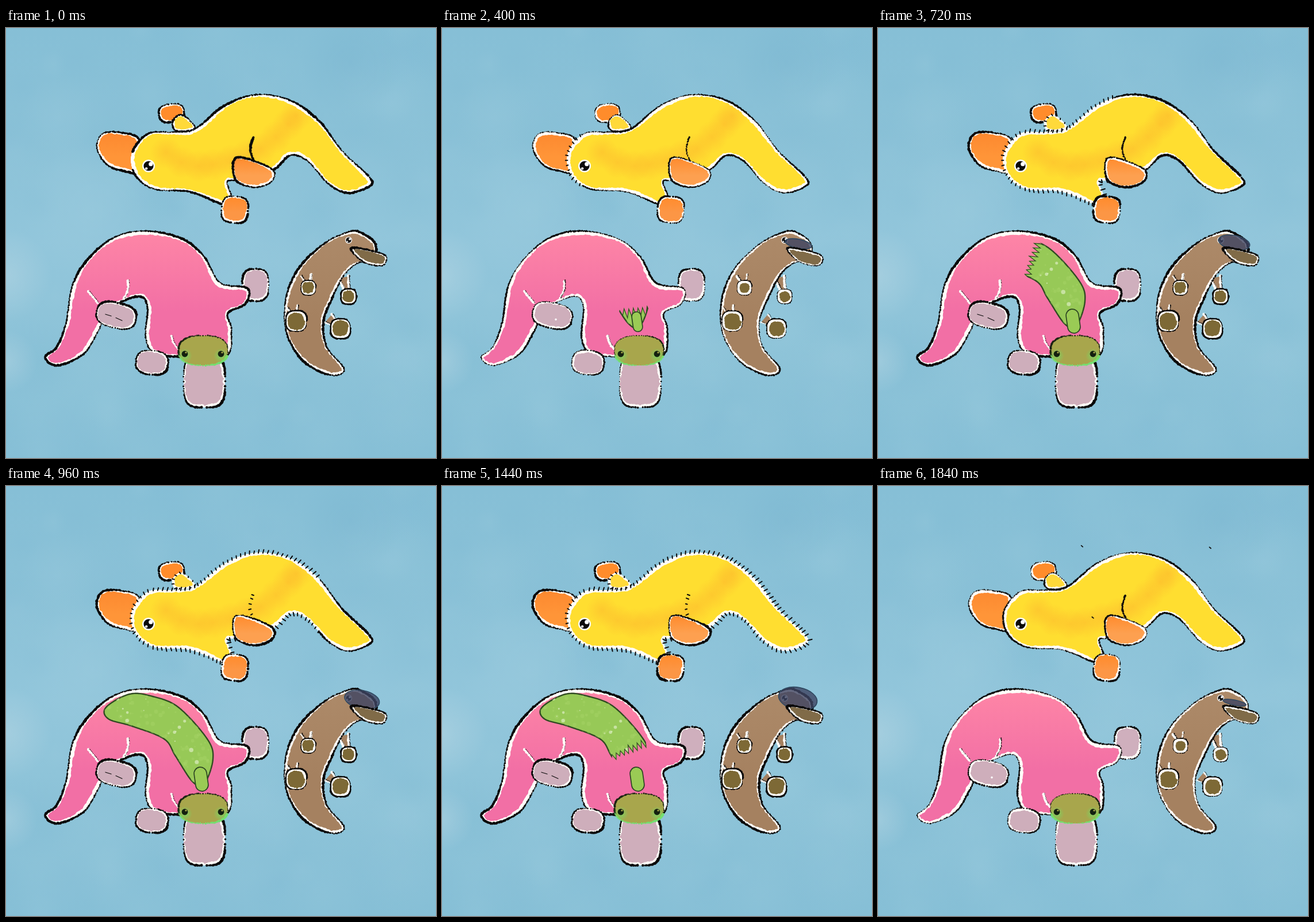
Recreate the animation shown at these times as an HTML page with a canvas. Size 748 by 748 pixels, loop 1.92 s.

```html
<!DOCTYPE html>
<html lang="en">
<head>
<meta charset="utf-8">
<title>Three platypuses</title>
<style>
html, body { margin: 0; width: 100%; height: 100%; overflow: hidden; background: #8cc2d8; }
canvas { display: block; }
</style>
</head>
<body>
<canvas id="stage" width="748" height="748"></canvas>
<script>
const SIZE = 748, STEP = 80, STEPS = 24;
const BLACK = '#0b0a0a', WHITE = '#fffdf8';
const ctx = document.getElementById('stage').getContext('2d');
let seed = 1, penWidth = 2;
const rnd = () => (seed = seed * 16807 % 2147483647) / 2147483647;
const clamp = v => Math.max(0, Math.min(1, v));

// Catmull-Rom curve through "x,y x,y ...", sampled about every 2 px
function curve(text, closed = true) {
  const keys = text.split(' ').map(p => p.split(',').map(Number));
  const n = keys.length, pts = [];
  const at = i => closed ? keys[(i + n) % n] : keys[Math.max(0, Math.min(n - 1, i))];
  for (let i = 0; i < (closed ? n : n - 1); i++) {
    const [a, b, c, d] = [at(i - 1), at(i), at(i + 1), at(i + 2)];
    const m = Math.max(1, Math.round(Math.hypot(c[0] - b[0], c[1] - b[1]) / 2));
    for (let j = 0; j < m; j++) {
      const t = j / m;
      pts.push([0, 1].map(e => b[e] + t * (c[e] - a[e] + t * (2 * a[e] - 5 * b[e] + 4 * c[e] - d[e]
        + t * (3 * b[e] - a[e] - 3 * c[e] + d[e]))) / 2));
    }
  }
  return pts;
}

// Superellipse: rounder for small power, boxier for large
function blob(x, y, rx, ry, turn = 0, power = 2.7) {
  const n = Math.round(1.5 * (rx + ry));
  const bend = v => Math.sign(v) * Math.abs(v) ** (2 / power);
  return Array.from({ length: n }, (_, i) => {
    const a = i / n * 2 * Math.PI;
    const u = rx * bend(Math.cos(a)), v = ry * bend(Math.sin(a));
    return [x + u * Math.cos(turn) - v * Math.sin(turn), y + u * Math.sin(turn) + v * Math.cos(turn)];
  });
}

function shape(pts, top, bottom = top) {
  const path = new Path2D();
  pts.forEach(([x, y]) => path.lineTo(x, y));
  path.closePath();
  const ys = pts.map(p => p[1]);
  const fill = ctx.createLinearGradient(0, Math.min(...ys), 0, Math.max(...ys));
  fill.addColorStop(0, top);
  fill.addColorStop(.6, bottom);
  return { pts, path, fill };
}

const yellow = {
  body: shape(curve('247,184 219,218 225,256 258,280 320,285 374,306 398,312 392,290 385,267 404,264 463,248 494,222 524,231 560,270 595,287 634,274 630,257 585,214 545,162 495,126 435,116 380,135 328,176 290,181'), '#ffde30'),
  bill: shape(curve('232,195 200,182 168,184 158,209 176,238 206,249 230,248'), '#fc882f', '#ff9538'),
  backFoot: shape(blob(288, 148, 22, 16, -.1), '#ff8c2b'),
  backLeg: shape(curve('290,162 306,151 329,174 296,179'), '#ffd93a'),
  fin: shape(curve('396,231 415,226 463,246 462,267 432,277 400,265'), '#ff8a2b', '#fda050'),
  foot: shape(blob(398, 316, 23, 23, .1, 3.2), '#ff8a2a', '#fc9645'),
  crease: curve('430,190 425,212 431,231', false),
  patches: curve('505,152 440,212 330,240 262,205', false)
};

const pink = {
  body: shape(curve('68,573 90,587 135,567 160,528 180,490 228,467 246,484 243,540 262,567 320,572 384,570 392,525 386,496 416,480 420,453 372,443 345,398 305,366 240,353 185,366 140,405 115,450 104,515 88,555'), '#fe86a6', '#f26fa5'),
  feet: [blob(192, 500, 35, 22, .22), blob(254, 582, 28, 21, .1)].map(p => shape(p, '#ceaebb')),
  hand: shape(blob(434, 447, 23, 28, 0, 3), '#cfafbd'),
  bill: shape(blob(345, 615, 36, 45, 0, 3.6), '#cfaebb'),
  head: shape(blob(343, 561, 43, 26, 0, 2.5), '#a8a64c'),
  creases: ['143,458 160,479', '212,440 212,456 204,472', '288,536 292,549 300,559'].map(t => curve(t, false))
};

const brown = {
  body: shape(curve('598,354 555,374 510,417 487,470 488,530 518,580 565,604 588,593 558,555 552,512 565,475 588,430 612,409 640,402 642,375 620,357'), '#ad8a69', '#a58160'),
  bill: shape(curve('600,384 625,385 660,396 655,413 622,407'), '#806b48'),
  outer: [foot(596, 467, 12, 587, 434), foot(582, 523, 16, 561, 505)],
  inner: [foot(526, 452, 12, 522, 430), foot(505, 510, 17, 498, 485)]
};

const pickle = shape(curve('174,385 215,362 255,366 300,385 350,440 360,475 345,518 325,515 295,470 275,440 220,418 178,405'), '#97c957');
const spine = curve('335,505 325,455 290,410 230,388 172,385', false);

// Round foot on a short leg that widens towards the joint
function foot(x, y, r, jx, jy) {
  const d = Math.hypot(x - jx, y - jy);
  const nx = (y - jy) / d, ny = (jx - x) / d;
  const sides = [-1, 1].map(k => curve(
    `${jx + k * 9 * nx},${jy + k * 9 * ny} ${(x + jx) / 2 + k * 5 * nx},${(y + jy) / 2 + k * 5 * ny} ${x + k * 4 * nx},${y + k * 4 * ny}`, false));
  return { sides, leg: shape([...sides[0], ...sides[1].reverse()], '#a58160'), pad: shape(blob(x, y, r, r), '#7d6936') };
}

function dot(x, y, r, color) {
  ctx.fillStyle = color;
  ctx.beginPath();
  ctx.arc(x, y, r, 0, 7);
  ctx.fill();
}

function wash(x, y, r, color) {
  const g = ctx.createRadialGradient(x, y, 0, x, y, r);
  g.addColorStop(0, color);
  g.addColorStop(1, color.slice(0, 7) + '00');
  dot(x, y, r, g);
}

// Dry ink line: dots of uneven size
function ink(pts, color = BLACK, w = penWidth, keep = () => true) {
  const phase = rnd() * 6;
  pts.forEach((p, i) => {
    const r = w * (.62 + .25 * Math.sin(i * .07 + phase) + .4 * rnd());
    if (keep(p)) dot(p[0] + rnd() - .5, p[1] + rnd() - .5, r, color);
  });
}

// Fill with a white rim along the inside of the edge
function paint(s, rim, detail = () => {}) {
  ctx.save();
  ctx.clip(s.path);
  ctx.fillStyle = s.fill;
  ctx.fill(s.path);
  detail();
  ink(s.pts, WHITE, rim);
  ctx.restore();
}

function draw(s, rim = 4.5) {
  paint(s, rim);
  ink(s.pts);
}

function crease(pts) {
  ink(pts, WHITE, 2.2);
  ink(pts.map(([x, y]) => [x + 2, y - 1]), BLACK, .9);
}

function stroke(x, y, dx, dy, w) {
  ctx.strokeStyle = BLACK;
  ctx.lineWidth = w;
  ctx.lineCap = 'round';
  ctx.beginPath();
  ctx.moveTo(x, y);
  ctx.lineTo(x + dx, y + dy);
  ctx.stroke();
}

// Shared growth of fur and pickle, from the head backwards
const growth = s => clamp((s - 3) / 8) ** 1.9;

// The outline turns to hairs, which later lift off and blow away
function furry(pts, s, length = 5) {
  const front = 220 + 325 * growth(s) + 35 * Math.max(0, s - 15);
  const lift = Math.max(0, s - 18);
  const ox = 4 * lift, oy = -2 * lift ** 2.2;
  const thin = s < 22 ? 1 : s < 23 ? 5 : 32;
  ink(pts, BLACK, penWidth, ([x]) => s >= 22 || x > front);
  for (let i = 0; i < pts.length - 1; i += 4) {
    const [x, y] = pts[i], [nx, ny] = pts[i + 1];
    if (s < 4 || x > front || (i / 4 + 5) % thin) continue;
    const d = Math.hypot(nx - x, ny - y) || 1;
    const ux = (y - ny) / d, uy = (nx - x) / d;
    const len = length * (.8 + .4 * rnd());
    if (lift) stroke(x + ox, y + oy, 2.6, 2.2, 1.7);
    else stroke(x - ux, y - uy, ux * len + 1.5, uy * len, 2);
  }
}

function eye(x, y, r) {
  dot(x, y, r, '#fff');
  dot(x, y, r * .78, BLACK);
  dot(x + r * .35, y - r * .3, r * .33, '#fff');
  dot(x - r * .35, y + r * .4, r * .2, '#fff');
}

function drawYellow(s) {
  draw(yellow.backFoot, 3.6);
  paint(yellow.backLeg, 3.6);
  furry(yellow.backLeg.pts, s, 2.5);
  draw(yellow.bill, 5);
  paint(yellow.body, 5.6, () => yellow.patches.forEach(([x, y], i) => {
    if (i % 14 === 0) wash(x, y, 28, '#fcb42c80');
  }));
  furry(yellow.body.pts, s);
  furry(yellow.crease, s);
  draw(yellow.foot, 4);
  draw(yellow.fin, 4);
  eye(248, 240, 11);
}

// Everything on one side of a jagged line across the spine
function jaggedCut(p, growing) {
  const i = Math.min(spine.length - 3, Math.round(p * (spine.length - 1)));
  const [cx, cy] = spine[i], [nx, ny] = spine[i + 2];
  const turn = Math.atan2(ny - cy, nx - cx);
  const edge = [];
  for (let b = -60, k = 0; b <= 60; b += 4, k++)
    edge.push([(k % 2 ? 1 : -1) * (3 + 6 * rnd()), b]);
  const far = growing ? -400 : 400;
  const region = new Path2D(), jag = new Path2D();
  const place = (path, [a, b]) => path.lineTo(
    cx + a * Math.cos(turn) - b * Math.sin(turn), cy + a * Math.sin(turn) + b * Math.cos(turn));
  edge.forEach(q => place(jag, q));
  [[far, -400], [0, -400], ...edge, [0, 400], [far, 400]].forEach(q => place(region, q));
  return { region, jag };
}

function drawPickle(s) {
  const growing = s < 13;
  const p = growing ? growth(s) : clamp((s - 15) / 8) ** 1.7;
  if (p === (growing ? 0 : 1)) return;
  const cut = p > 0 && p < 1 && jaggedCut(p, growing);
  ctx.save();
  if (cut) ctx.clip(cut.region);
  ctx.fillStyle = pickle.fill;
  ctx.fill(pickle.path);
  ctx.strokeStyle = '#304b22';
  ctx.lineWidth = 2.4;
  ctx.stroke(pickle.path);
  ctx.clip(pickle.path);
  seed = 99;
  for (let k = 0; k < 260; k++)
    dot(170 + rnd() * 190, 360 + rnd() * 160, .8 + rnd() * 3, k % 7 ? '#a9d46c60' : '#d8ecbac0');
  if (cut) ctx.stroke(cut.jag);
  ctx.restore();
}

function drawStem(s) {
  const grow = clamp((s - 1) / 6), left = clamp((23 - s) / 4);
  if (!grow || !left) return;
  const rx = (2.5 + 8.5 * grow) * Math.sqrt(left), ry = (10 + 11 * grow) * left;
  ctx.save();
  ctx.translate(339.5, 513 - 3 * grow - 52 * (1 - left));
  ctx.rotate(-.14);
  ctx.beginPath();
  ctx.roundRect(-rx, -ry, 2 * rx, 2 * ry, rx);
  ctx.fillStyle = '#9acb55';
  ctx.fill();
  ctx.lineWidth = 1.7;
  ctx.strokeStyle = '#2c4522';
  ctx.stroke();
  ctx.restore();
}

function drawPink(s) {
  draw(pink.hand);
  draw(pink.body, 6);
  pink.creases.forEach(crease);
  pink.feet.forEach(f => draw(f, 4));
  const pose = s % 3;
  if (pose === 0) stroke(173, 498, 10, 3, 1.3);
  if (pose < 2) stroke(191, 504, 11, 5, 1.2);
  else dot(198, 507, 1.8, '#fff');
  drawPickle(s);
  drawStem(s);
  seed = 500 + pose;
  draw(pink.bill, 5);
  ctx.fillStyle = pink.head.fill;
  ctx.fill(pink.head.path);
  ink(pink.head.pts, '#1c2413', penWidth * .8, p => p[1] < 570);
  ink(pink.head.pts, '#74df70', 2, p => p[1] >= 570);
  [311, 374].forEach(x => {
    wash(x, 570, 13, '#70df67c0');
    dot(x, 567, 5.4, '#14200f');
    dot(x + 2, 564.5, 1.6, '#a8a64c');
  });
}

function drawFoot({ sides, leg, pad }) {
  ctx.fillStyle = leg.fill;
  ctx.fill(leg.path);
  sides.forEach(crease);
  ink(pad.pts, BLACK, penWidth + .8);
  paint(pad, 3.4);
}

// Dark glassy bubble that swells over the head and shrinks again
function drawBubble(s) {
  const b = Math.min(1, s / 15, (23.6 - s) / 4);
  if (b <= 0) return;
  ctx.beginPath();
  ctx.ellipse(620.5 - 1.5 * b, 378 - 8 * b, 18 + 16 * b, 2 + 17.5 * b, .2, 0, 7);
  ctx.fillStyle = 'rgba(62,68,98,.8)';
  ctx.fill();
  ctx.lineWidth = 1.6;
  ctx.strokeStyle = '#2f4860';
  ctx.stroke();
}

function drawBrown(s) {
  brown.outer.forEach(drawFoot);
  draw(brown.body, 4.6);
  eye(596, 369, 6);
  drawBubble(s);
  draw(brown.bill, 3.6);
  brown.inner.forEach(drawFoot);
}

// Soft watercolour sky, painted once and kept
function makeSky() {
  const g = ctx.createLinearGradient(0, 0, 0, SIZE);
  ['#86bfd6', '#8ac1d7', '#92c6db', '#8dc3d8', '#86bfd6'].forEach((c, i) => g.addColorStop(i / 4, c));
  ctx.fillStyle = g;
  ctx.fillRect(0, 0, SIZE, SIZE);
  seed = 7;
  for (let i = 0; i < 120; i++)
    wash(rnd() * SIZE, rnd() * SIZE, 25 + rnd() * 70, i % 2 ? '#9bcbdd30' : '#7fbad330');
  wash(0, 430, 80, '#b2d4e290');
  wash(0, 580, 55, '#b2d4e280');
  wash(150, 320, 120, '#9fcddf70');
  wash(600, 60, 90, '#78b4cf70');
  const sky = document.createElement('canvas');
  sky.width = sky.height = SIZE;
  sky.getContext('2d').drawImage(ctx.canvas, 0, 0);
  return sky;
}

const sky = makeSky();

// Three ink drawings alternate, the first one the boldest
function render(s) {
  const pose = s % 3;
  ctx.drawImage(sky, 0, 0);
  penWidth = [2.1, 1.4, 1.6][pose];
  [drawYellow, drawPink, drawBrown].forEach((part, i) => {
    seed = 1000 * (i + 1) + 77 * pose;
    part(s);
  });
}

let shown = -1;
const start = performance.now();
function loop() {
  const s = Math.floor((performance.now() - start) / STEP) % STEPS;
  if (s !== shown) render(shown = s);
  requestAnimationFrame(loop);
}
loop();
</script>
</body>
</html>
```
